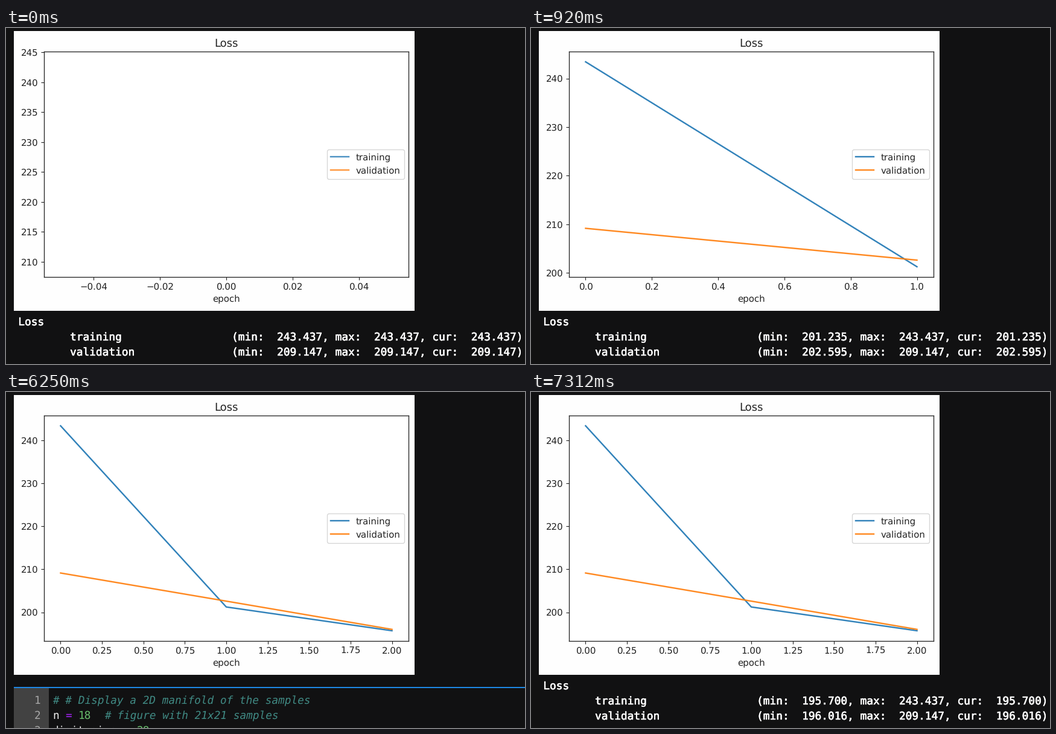
Recreate the animation shown at these times as a matplotlib script. Size 860 px wide and 556 px high, loop 8000 ms.

```python
import numpy as np
import matplotlib.pyplot as plt
from matplotlib.animation import FuncAnimation
from matplotlib.patches import Rectangle
from matplotlib.patheffects import withStroke

W, H, DPI = 860, 556, 100
STEP, LOOP = 40, 8000          # ms
PX = 72 / DPI                  # points per pixel

BG, INK = "#111112", "#222222"
BLUE, ORANGE = "#1f77b4", "#ff7f0e"
COMMENT = "#408a84"

TRAINING = [243.437, 201.235, 195.700]
VALIDATION = [209.147, 202.595, 196.016]

COL, LEFT = 10.72, 20.3        # console column width and left edge

plt.rcParams.update({
    "font.family": "DejaVu Sans",
    "font.size": 15 * PX,
    "text.hinting": "none",
    "text.color": INK,
    "lines.linewidth": 2.4 * PX,
    "axes.linewidth": 1.3 * PX,
    "axes.edgecolor": INK,
    "axes.labelcolor": INK,
    "xtick.color": INK,
    "ytick.color": INK,
})

fig = plt.figure(figsize=(W / DPI, H / DPI), dpi=DPI, facecolor=BG)
stage = fig.add_axes([0, 0, 1, 1])
stage.set(xlim=(0, W), ylim=(H, 0))
stage.axis("off")


def box(x0, y0, x1, y1, color):
    return stage.add_patch(
        Rectangle((x0, y0), x1 - x0, y1 - y0, facecolor=color, lw=0))


def mono(x, y, text, color="white", **style):
    return stage.text(x, y, text, color=color, family="DejaVu Sans Mono",
                      size=COL / 0.602 * PX, va="baseline", clip_on=True,
                      **style)


def labels(ticks, fmt):
    return [format(t + 0.0, fmt).replace("-", "\u2212") for t in ticks]


def make_chart(epochs, xticks, xfmt, yticks, alpha=0.92):
    ax = fig.add_axes([63 / W, 1 - 412 / H, 604 / W, 373 / H])
    for name, data, color in (("training", TRAINING, BLUE),
                              ("validation", VALIDATION, ORANGE)):
        ax.plot(range(epochs), data[:epochs], color=color, alpha=alpha,
                label=name)
    if epochs == 1:
        ax.set_xlim(-0.055, 0.055)
    ax.set_xticks(xticks, labels(xticks, xfmt))
    ax.set_yticks(yticks, labels(yticks, ".0f"))
    ax.set_title("Loss")
    ax.set_xlabel("epoch")
    ax.legend(loc="center right")
    return ax


def make_log(epochs):
    heavy = [withStroke(linewidth=0.6 * PX, foreground="white")]
    items = [mono(LEFT, 492, "Loss", path_effects=heavy)]
    for y, name, data in ((517, "training", TRAINING),
                          (542, "validation", VALIDATION)):
        seen = data[:epochs]
        stats = (f"(min: {min(seen):8.3f}, max: {max(seen):8.3f}, "
                 f"cur: {seen[-1]:8.3f})")
        items += [mono(LEFT + 8 * COL, y, name, path_effects=heavy),
                  mono(LEFT + 33 * COL, y, stats, path_effects=heavy)]
    return items


def make_cell():
    x, ys = 77, (516, 541, 566)
    items = [box(13, 490, 71, H, "#424242"), box(13, 488, W, 490, "#1e88e5")]
    items += [mono(46.5, y, str(i + 1), "#a6a6a6") for i, y in enumerate(ys)]
    code = [
        (0, 0, "# # Display a 2D manifold of the samples", COMMENT),
        (1, 0, "n", "#f0f0f0"),
        (1, 2, "=", "#aa22ff"),
        (1, 4, "18", "#66bb6a"),
        (1, 8, "# figure with 21x21 samples", COMMENT),
        (2, 0, "digit_size", "#f0f0f0"),
        (2, 11, "=", "#aa22ff"),
        (2, 13, "28", "#66bb6a"),
    ]
    for row, col, text, color in code:
        style = "italic" if color == COMMENT else "normal"
        items.append(mono(x + col * COL, ys[row], text, color, style=style))
    return items


box(13, 5, 677, 468, "#fefefe")
charts = [
    make_chart(1, np.linspace(-0.04, 0.04, 5), ".2f",
               np.arange(210, 246, 5), alpha=0.8),
    make_chart(2, np.linspace(0, 1, 6), ".1f", np.arange(200, 241, 10)),
    make_chart(3, np.linspace(0, 2, 9), ".2f", np.arange(200, 241, 10)),
]
logs = [make_log(n) for n in (1, 2, 3)]
cell = make_cell()


def show(items, visible):
    for item in items:
        item.set_visible(visible)


def update(frame):
    t = frame * STEP
    epoch = 0 if t < 920 else 1 if t < 6240 else 2
    flash = 6240 <= t < 6280   # output cleared, next cell jumps up
    for i, (chart, log) in enumerate(zip(charts, logs)):
        chart.set_visible(i == epoch)
        show(log, i == epoch and not flash)
    show(cell, flash)
    return []


anim = FuncAnimation(fig, update, frames=LOOP // STEP, interval=STEP,
                     repeat=True, repeat_delay=0)
plt.show()
```
